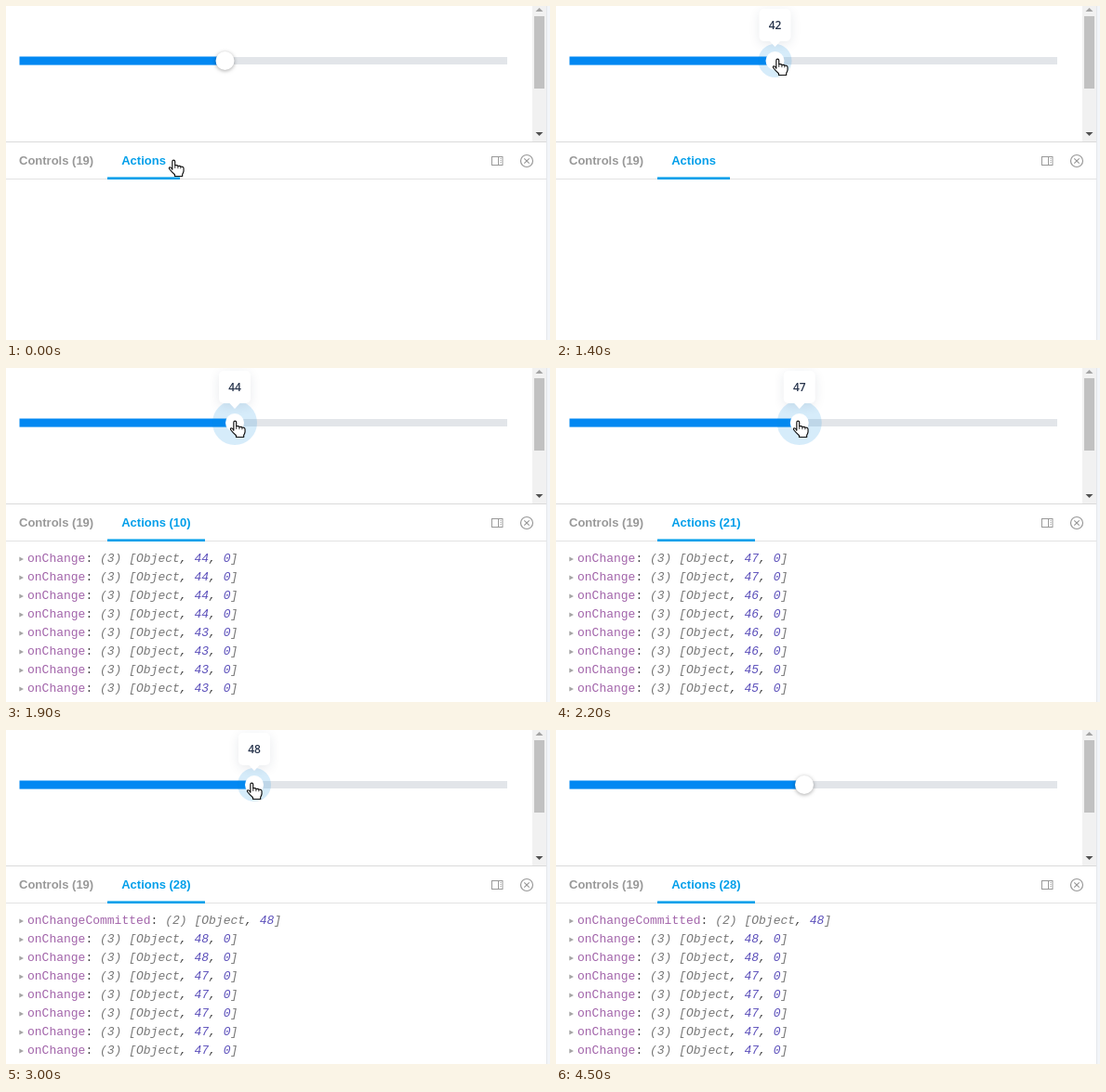
These frames come from a looping animation (585x360 px, 4.6 s). An HTML page with a canvas:

```html
<!DOCTYPE html>
<html lang="en">
<head>
<meta charset="utf-8">
<title>Slider actions</title>
<style>
html, body { margin: 0; width: 100%; height: 100%; overflow: hidden; background: #fff; }
canvas { display: block; width: 585px; height: 360px; }
</style>
</head>
<body>
<canvas id="stage"></canvas>
<script>
const W = 585, H = 360, LOOP = 4600, STEP = 100;
const canvas = document.getElementById('stage');
const dpr = window.devicePixelRatio || 1;
canvas.width = W * dpr;
canvas.height = H * dpr;
const ctx = canvas.getContext('2d');

const BLUE = '#0288f2', TAB = '#029fea', GREY = '#999';
const KEY = '#a264aa', PUNCT = '#444', DIM = '#777', NUM = '#5c50bb';
const SANS = 'bold 13px "Liberation Sans", Arial, sans-serif';
const MONO = '13px "Courier New", "Liberation Mono", monospace';
const TIP = '600 12px "Open Sans", "Noto Sans", sans-serif';
const TRACK = { x: 15, y: 59, w: 525 };

// [time, x, y, shape] of the pointer
const pointer = [
  [0, 175, 166, 'hand'], [600, 206, 112, 'arrow'], [700, 250, 41, 'hand'],
  [900, 253, 34, 'hand'], [1000, 246, 46, 'hand'], [1100, 235, 58, 'hand'],
  [1400, 233, 57, 'hand'], [1700, 234, 57, 'hand'], [1800, 237, 57, 'hand'],
  [1900, 241, 57, 'hand'], [2000, 246, 57, 'hand'], [2100, 251, 57, 'hand'],
  [2200, 255, 57, 'hand'], [2300, 257, 57, 'hand'], [2400, 258, 57, 'hand'],
  [2500, 259, 57, 'hand'], [3300, 267, 100, 'arrow'], [3400, 273, 146, 'arrow'],
  [3500, 275, 163, 'arrow'], [3700, 281, 201, 'arrow'], [4100, 206, 116, 'arrow'],
  [4200, 85, 19, 'arrow'], [4300, 0, 0, '']
];
// [time, number of logged actions]
const counts = [
  [0, 0], [1700, 1], [1800, 6], [1900, 10], [2000, 14], [2100, 18],
  [2200, 21], [2300, 23], [2400, 25], [2500, 26], [2800, 28]
];
// [time, halo radius]
const halos = [[0, 0], [1100, 18], [1700, 24], [2800, 18.5], [3000, 18], [4500, 0]];
// [time, tooltip opacity]
const tips = [[0, 0], [1100, 0.8], [1400, 1], [3300, 0.4], [3400, 0]];

// Logged values, oldest first: [value, repeats]
const log = [[43, 6], [44, 5], [45, 4], [46, 4], [47, 6], [48, 2]]
  .flatMap(([v, n]) => Array(n).fill(v));

const handPath = new Path2D('M4.3 10.5V2.3Q4.3 .8 5.6 .8Q7 .8 7 2.3V6.2Q9.5 5.6 10 7Q12.3 6.4 12.8 7.6Q15.8 7 15.8 9.5V12Q15.5 14 14.5 15.2V17.3H6.8V15.6Q3.5 12.8 1.2 9.7Q.7 8.3 2 8.1Q3.2 8.2 4.3 10.5Z');
const knuckles = new Path2D('M7 6V9.2M10 7V9.4M12.8 7.6V9.6');
const arrowPath = new Path2D('M.5 .5V15.2L4 12L6.6 17.8L9 16.7L6.4 11.1H11.3Z');

const at = (keys, t) => keys.filter(k => k[0] <= t).pop();

function rect(x, y, w, h, color) {
  ctx.fillStyle = color;
  ctx.fillRect(x, y, w, h);
}

function text(str, x, y, color, font) {
  ctx.font = font;
  ctx.fillStyle = color;
  ctx.fillText(str, x, y);
  return ctx.measureText(str).width;
}

function poly(points, color) {
  ctx.beginPath();
  points.forEach(([x, y]) => ctx.lineTo(x, y));
  ctx.closePath();
  ctx.fillStyle = color;
  ctx.fill();
}

function circle(x, y, r, color) {
  ctx.beginPath();
  ctx.arc(x, y, r, 0, Math.PI * 2);
  ctx.fillStyle = color;
  ctx.fill();
}

function shadow(color, blur, dy) {
  ctx.shadowColor = color;
  ctx.shadowBlur = blur * dpr;
  ctx.shadowOffsetY = dy * dpr;
}

function slider(value, halo) {
  const x = TRACK.x + TRACK.w * value / 100;
  rect(TRACK.x, 55, TRACK.w - 1, 8, '#e2e5e9');
  rect(TRACK.x - 0.5, 54.5, x - TRACK.x, 9.1, BLUE);
  if (halo) circle(x, TRACK.y, halo, 'rgba(2,136,222,.16)');
  ctx.save();
  if (!halo) shadow('rgba(0,0,0,.35)', 4, 1);
  circle(x, TRACK.y, 10, '#fff');
  ctx.restore();
  return x;
}

function tooltip(x, value, alpha) {
  if (!alpha) return;
  ctx.save();
  ctx.globalAlpha = alpha;
  ctx.save();
  shadow('rgba(30,50,80,.1)', 12, 3);
  ctx.beginPath();
  ctx.roundRect(x - 17, 3, 34, 35, 5);
  ctx.fillStyle = '#fff';
  ctx.fill();
  ctx.restore();
  poly([[x - 6, 37.5], [x + 6, 37.5], [x, 44]], '#fff');
  ctx.textAlign = 'center';
  text(String(value), x, 25, '#27344c', TIP);
  ctx.restore();
}

function scrollbar() {
  rect(566, 0, 15, 146, '#f1f1f1');
  rect(568, 11, 11, 78, '#c1c1c1');
  poly([[569.5, 6], [577.5, 6], [573.5, 2]], '#a3a3a3');
  poly([[569.5, 136], [577.5, 136], [573.5, 140]], '#505050');
}

function icons() {
  ctx.strokeStyle = GREY;
  ctx.lineWidth = 1;
  ctx.strokeRect(522.5, 162.5, 11.5, 9);
  ctx.beginPath();
  ctx.moveTo(529.5, 162);
  ctx.lineTo(529.5, 172);
  ctx.stroke();
  for (const y of [164, 166, 168]) rect(531, y, 2, 1, '#ccc');
  ctx.lineWidth = 1.2;
  ctx.beginPath();
  ctx.arc(560, 167, 6.5, 0, Math.PI * 2);
  ctx.moveTo(557.3, 164.3);
  ctx.lineTo(562.7, 169.7);
  ctx.moveTo(562.7, 164.3);
  ctx.lineTo(557.3, 169.7);
  ctx.stroke();
}

function tabs(count) {
  rect(0, 146, 581, 1, '#dadada');
  rect(0, 186, 581, 1, '#e3e3e3');
  text('Controls (19)', 14, 171, GREY, SANS);
  const w = text(count ? `Actions (${count})` : 'Actions', 124.2, 171, TAB, SANS);
  rect(109, 184.4, Math.ceil(w + 30), 2.6, TAB);
  icons();
}

function row(i, name, values) {
  const y = 209 + i * 20, italic = 'italic ' + MONO;
  let x = 23;
  const put = (str, color, font = italic) => { x += text(str, x, y, color, font); };
  poly([[14.3, y - 5.5], [19, y - 3], [14.3, y - 0.5]], '#a5a5a5');
  put(name, KEY, MONO);
  put(': ', PUNCT, MONO);
  put(`(${values.length + 1}) `, DIM);
  put('[Object', DIM);
  for (const v of values) {
    put(', ', PUNCT);
    put(String(v), NUM);
  }
  put(']', DIM);
}

function actions(count) {
  for (let i = 0; i < Math.min(count, 8); i++) {
    const n = count - 1 - i;
    if (n < log.length) row(i, 'onChange', [log[n], 0]);
    else row(i, 'onChangeCommitted', [48]);
  }
}

function cursor([, x, y, shape]) {
  if (!shape) return;
  ctx.save();
  ctx.translate(x, y);
  ctx.lineJoin = 'round';
  if (shape === 'hand') {
    ctx.translate(-0.7, -0.8);
    ctx.scale(1.06, 1.06);
    ctx.fillStyle = '#fff';
    ctx.strokeStyle = '#111';
    ctx.lineWidth = 1.1;
    ctx.fill(handPath);
    ctx.stroke(handPath);
    ctx.lineWidth = 0.8;
    ctx.stroke(knuckles);
  } else {
    ctx.strokeStyle = '#fff';
    ctx.lineWidth = 2;
    ctx.stroke(arrowPath);
    ctx.fillStyle = '#1c1c1c';
    ctx.fill(arrowPath);
  }
  ctx.restore();
}

function draw(now) {
  const t = Math.floor((now % LOOP) / STEP) * STEP;
  const count = at(counts, t)[1];
  const value = count ? log[Math.min(count, log.length) - 1] : 42;
  ctx.setTransform(dpr, 0, 0, dpr, 0, 0);
  rect(0, 0, W, H, '#fff');
  const x = slider(value, at(halos, t)[1]);
  tooltip(x, value, at(tips, t)[1]);
  scrollbar();
  tabs(count);
  actions(count);
  rect(581, 0, 4, H, '#f2f5f9');
  rect(581, 0, 1, H, '#e4e7eb');
  cursor(at(pointer, t));
}

const start = performance.now();
function tick() {
  draw(performance.now() - start);
  requestAnimationFrame(tick);
}
tick();
</script>
</body>
</html>
```
